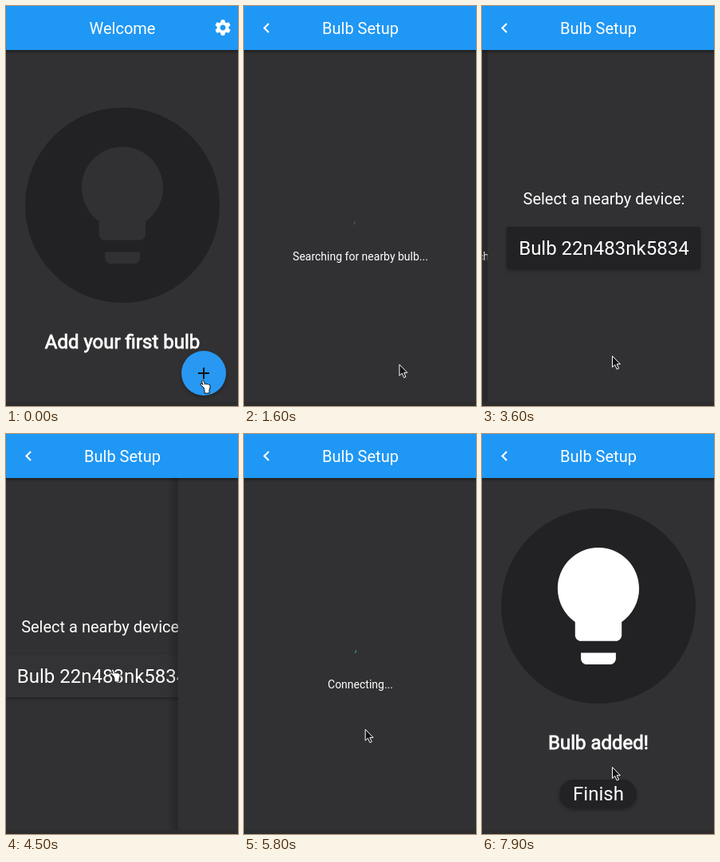
An HTML page that plays this animation: 291 px wide and 500 px high, repeating every 8 s.

```html
<!DOCTYPE html>
<html lang="en">
<head>
<meta charset="utf-8">
<title>Bulb Setup</title>
<style>
  html, body { margin: 0; width: 100%; height: 100%; overflow: hidden; background: #313133; }
  svg { display: block; width: 100vw; height: 100vh; }
  text { font-family: Roboto, sans-serif; fill: #fff; text-anchor: middle; }
  .heavy { stroke: #fff; stroke-width: .8px; }
  .dark { fill: #222224; }
  .raised { filter: drop-shadow(0 2px 2px rgba(0, 0, 0, .3)); }
</style>
</head>
<body>
<svg id="stage" viewBox="0 0 291 500" preserveAspectRatio="none"></svg>
<script>
const LOOP = 8000, TICK = 100, WIDTH = 292, MID = 146, SLIDE = 400;
const PUSH = { setup: 280, select: 3320, connect: 4460, done: 7480 };
const BLUE = '#1f97f5', PAGE = '#313133';

// Markup helpers
const label = (y, size, text, cls = '') =>
  `<text x="${MID}" y="${y}" font-size="${size}" class="${cls}">${text}</text>`;

const page = (id, content) => `<g id="${id}">
  <rect x="-14" width="14" height="500" fill="url(#edge)"/>
  <rect width="${WIDTH}" height="500" fill="${PAGE}"/>${content}
  <rect y="495" width="${WIDTH}" height="5" fill="#2d2d2e"/></g>`;

const header = (title, icon) => `
  <rect y="55" width="${WIDTH}" height="5" fill="url(#drop)"/>
  <rect width="${WIDTH}" height="55" fill="${BLUE}"/>${label(35, 20, title)}${icon}`;

const badge = (cy, color) => `<circle class="dark" cx="${MID}" cy="${cy}" r="122"/>
  <path transform="translate(${MID} ${cy}) scale(7.3) translate(-12 -12)" fill="${color}"
    d="M9 21c0 .55.45 1 1 1h4c.55 0 1-.45 1-1v-1H9v1zm3-19C8.14 2 5 5.14 5 9c0 2.38 1.19 4.47
    3 5.74V17c0 .55.45 1 1 1h6c.55 0 1-.45 1-1v-2.26c1.81-1.27 3-3.36 3-5.74 0-3.86-3.14-7-7-7z"/>`;

const spinner = id => `<path id="${id}" fill="none" stroke="#64ffda" stroke-width="4"/>`;

const teeth = [0, 60, 120, 180, 240, 300].map(a =>
  `<path transform="rotate(${a})" d="M-3.2-5.5L-2.1-9.8H2.1L3.2-5.5z"/>`).join('');
const gear = `<g transform="translate(272 27)" fill="#fff">${teeth}
  <circle r="5.4" fill="none" stroke="#fff" stroke-width="3.8"/></g>`;
const back = '<path d="M31 22L25.5 27.5L31 33" fill="none" stroke="#fff" stroke-width="2.2"/>';

const $ = id => document.getElementById(id);

$('stage').innerHTML = `
  <defs>
    <linearGradient id="edge"><stop stop-opacity="0"/><stop offset="1" stop-opacity=".22"/></linearGradient>
    <linearGradient id="drop" x2="0" y2="1"><stop stop-opacity=".35"/><stop offset="1" stop-opacity="0"/></linearGradient>
  </defs>
  ${page('welcome', badge(249, PAGE) + label(428, 24, 'Add your first bulb', 'heavy') + `
    <circle class="raised" cx="248" cy="459" r="28" fill="#2898f2"/>
    <path d="M241 459h14M248 452v14" stroke="#111" stroke-width="2"/>` + header('Welcome', gear))}
  ${page('setup',
    page('search', spinner('spinSearch') + label(318, 14, 'Searching for nearby bulb...')) +
    page('select', label(248, 20, 'Select a nearby device:') + `
      <rect class="dark raised" x="24" y="276" width="243" height="53" rx="3"/>
      <rect id="press" x="24" y="276" width="243" height="53" rx="3" fill="#fff" opacity="0"/>` +
      label(311, 24, 'Bulb 22n483nk5834')) +
    page('connect', spinner('spinConnect') + label(318, 14, 'Connecting...')) +
    page('done', badge(215, '#fff') + label(394, 24, 'Bulb added!', 'heavy') +
      '<rect class="dark raised" x="97" y="432" width="97" height="36" rx="18"/>' +
      label(458, 24, 'Finish')) +
    header('Bulb Setup', back))}
  <g id="cursor" stroke-linejoin="round">
    <path id="arrow" d="M.5.5V14.5L3.8 11.5L6.2 17L8.6 16L6.2 10.7H10.4z" fill="#111" stroke="#fff"/>
    <path id="hand" fill="#fff" stroke="#111" d="M2 12L-2 8.5Q-3 6.5-.5 7L1 8.5L-.5 4Q0 2 2 3.5L3.6 8
      Q4.5 6.4 6 8Q7.5 6.8 8.5 8.5Q10.5 8 10.2 11L9 15V19H3V16z"/>
  </g>`;

// Easing
const clamp = v => Math.min(1, Math.max(0, v));
const bezier = (x1, y1, x2, y2) => x => {
  if (x <= 0 || x >= 1) return clamp(x);
  const at = (a, b, s) => 3 * (1 - s) ** 2 * s * a + 3 * (1 - s) * s * s * b + s ** 3;
  let lo = 0, hi = 1;
  for (let i = 0; i < 24; i++) {
    const s = (lo + hi) / 2;
    if (at(x1, x2, s) < x) lo = s; else hi = s;
  }
  return at(y1, y2, lo);
};
const slideEase = bezier(.35, .91, .33, .97);
const spinEase = bezier(.4, 0, .2, 1);
const moveEase = bezier(.42, 0, .58, 1);

// Pages enter from the right while the page below drifts left by a third.
function slide(id, t, enter, leave = Infinity) {
  const el = $(id);
  const x = WIDTH * (1 - slideEase((t - enter) / SLIDE)) - WIDTH / 3 * slideEase((t - leave) / SLIDE);
  el.setAttribute('transform', `translate(${x.toFixed(2)} 0)`);
  el.style.display = t >= enter && t < leave + SLIDE ? '' : 'none';
}

function spin(id, age) {
  const cycle = Math.max(0, age) / 1400, phase = cycle % 1;
  const base = -123 + .243 * age + 270 * Math.floor(cycle);
  const from = base + 270 * spinEase(phase * 2 - 1);
  const to = Math.max(from + 1, base + 270 * spinEase(phase * 2));
  const point = deg => {
    const a = deg * Math.PI / 180;
    return `${(MID + 18 * Math.cos(a)).toFixed(2)} ${(255 + 18 * Math.sin(a)).toFixed(2)}`;
  };
  $(id).setAttribute('d', `M${point(from)}A18 18 0 ${+(to - from > 180)} 1 ${point(to)}`);
}

const moves = [ // start, end, x, y
  [0, 0, 246, 465],
  [1200, 1900, 163, 437],
  [3900, 4300, 133, 291],
  [5400, 6100, 163, 416]
];

function pointer(t) {
  let [, , x, y] = moves[0];
  for (const [start, end, toX, toY] of moves.slice(1)) {
    const k = moveEase((t - start) / (end - start));
    x += (toX - x) * k;
    y += (toY - y) * k;
  }
  const hand = t < 400 || (t >= 4200 && t < 4600);
  $('cursor').setAttribute('transform', `translate(${x.toFixed(2)} ${y.toFixed(2)})`);
  $('hand').style.display = hand ? '' : 'none';
  $('arrow').style.display = hand ? 'none' : '';
}

function render(t) {
  slide('welcome', t, -SLIDE, PUSH.setup);
  slide('setup', t, PUSH.setup);
  slide('search', t, -SLIDE, PUSH.select);
  slide('select', t, PUSH.select, PUSH.connect);
  slide('connect', t, PUSH.connect, PUSH.done);
  slide('done', t, PUSH.done);
  spin('spinSearch', t - 252);
  spin('spinConnect', t - 4472);
  $('press').setAttribute('opacity', t >= 4300 ? .08 : 0);
  pointer(t);
}

const begin = performance.now();
function tick() {
  const t = (performance.now() - begin) % LOOP;
  render(Math.floor(t / TICK) * TICK);
  requestAnimationFrame(tick);
}
tick();
</script>
</body>
</html>
```
